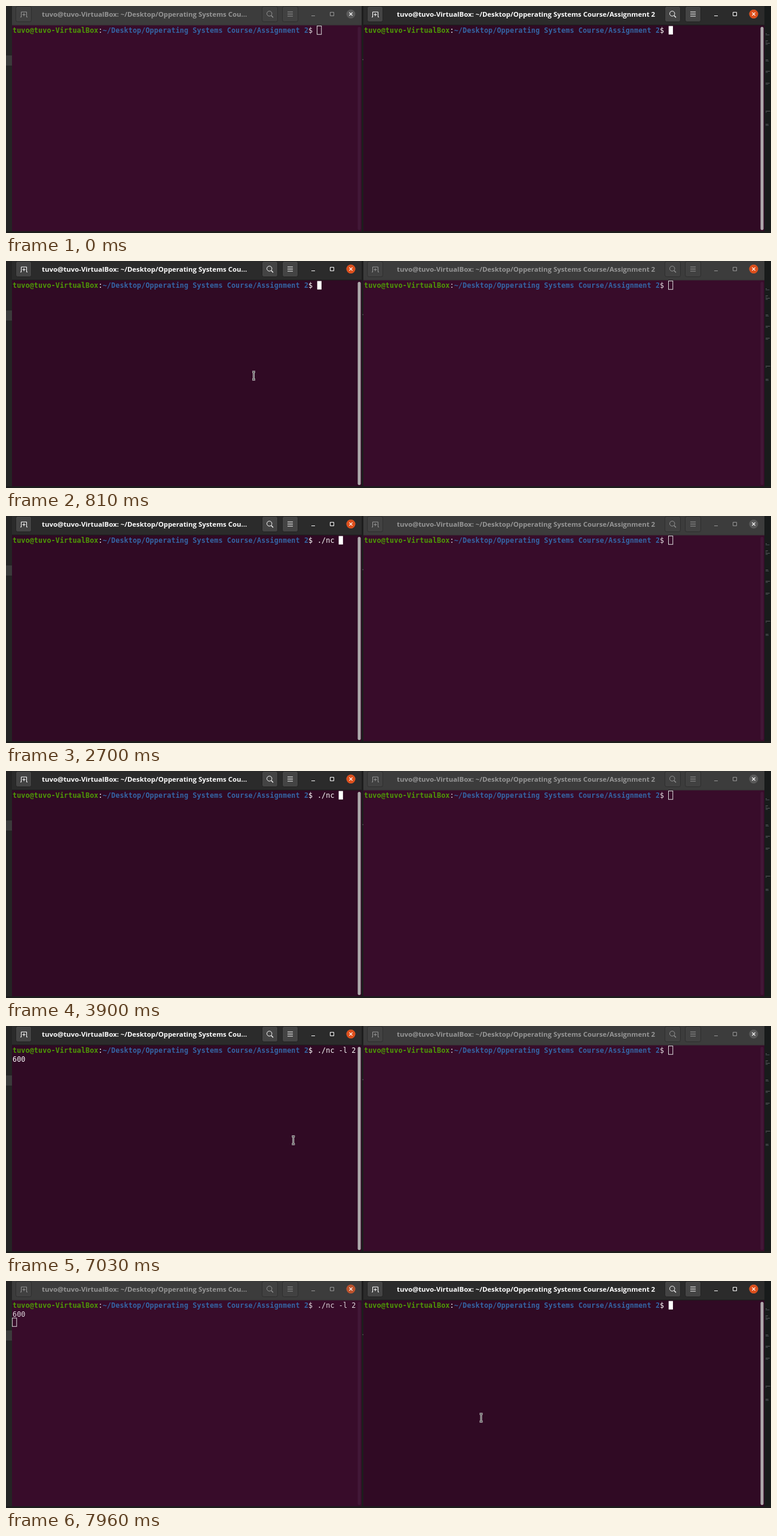
Write an HTML page that moves like this. It is 1280 px wide and 381 px high and loops after 8000 ms.

```html
<!DOCTYPE html>
<html lang="en">
<head>
<meta charset="utf-8">
<title>Two terminals</title>
<style>
html, body { margin: 0; width: 100%; height: 100%; overflow: hidden; background: #1d1d1d; }
svg { display: block; }
text { white-space: pre; }
.title { font: bold 11.39px "Open Sans", "Noto Sans", sans-serif; }
.term { font: 11.7px "DejaVu Sans Mono", monospace; letter-spacing: .138px; fill: #fff; }
.user, .path { font-weight: bold; fill-opacity: 1; }
.user { fill: #4e9a06; }
.path { fill: #3465a4; }
</style>
</head>
<body>
<svg id="stage" width="1280" height="381" viewBox="0 0 1280 381"></svg>
<script>
const LOOP = 8000, CELL = 7.182, LINE = 14.3, TOP = 33.6, PROMPT = 71, COLS = 80;
const HOST = "tuvo@tuvo-VirtualBox";
const DIR = "~/Desktop/Opperating Systems Course/Assignment 2";

const WINDOWS = [
  { x: 10, end: 595, title: 60, label: `${HOST}: ${DIR.slice(0, 32)}...` },
  { x: 598, end: 1269, title: 654, label: `${HOST}: ${DIR}` }
];

// Each click starts a focus change; fades take FADE ms, blinking has a half period of BLINK ms
const CLICKS = [600, 7700], CLICK_SHOWN = 130, FADE = 180, CLOSE_LAG = 190, BLINK = 600;
const [toLeft, toRight] = CLICKS.map(t => t + 25);

const BURSTS = [
  { at: 1220, text: "./", gap: 150 }, { at: 2430, text: "n" }, { at: 2630, text: "c ", gap: 70 },
  { at: 4500, text: "-l", gap: 70 }, { at: 4770, text: " " }, { at: 5430, text: "2" },
  { at: 5840, text: "600", gap: 130 }, { at: 6300, text: "\n" }
];
const KEYS = BURSTS.flatMap(({ at, text, gap = 0 }) => [...text].map((char, i) => ({ char, time: at + i * gap })));

const MOVES = [
  { start: 130, time: 270, from: [560, 328], to: [414.5, 192.5], power: 2 },
  { start: 6830, time: 270, from: [414.5, 192.5], to: [503.5, 191.5], power: 1 },
  { start: 7400, time: 100, from: [503.5, 191.5], to: [795, 229.5], power: 1 }
];

const ramp = (t, start, time) => Math.min(1, Math.max(0, (t - start) / time));

function mouseAt(t) {
  const typing = t >= KEYS[0].time && t < MOVES[1].start;
  const move = MOVES.filter(m => m.start <= t).pop();
  if (!move || typing) return null;
  const p = 1 - (1 - ramp(t, move.start, move.time)) ** move.power;
  return move.from.map((v, i) => v + (move.to[i] - v) * p);
}

const rect = (x, y, w, h, fill, more = "") =>
  `<rect x="${x}" y="${y}" width="${w}" height="${h}" fill="${fill}" ${more}/>`;
const line = (d, stroke, width = 1) =>
  `<path d="${d}" fill="none" stroke="${stroke}" stroke-width="${width}"/>`;

function chrome({ x, end, title, label }, active) {
  const c = active
    ? { head: "#2b2b2b", edge: "#1b1b1b", btn: "#444", rim: "#222", ink: "#fff", body: "#300a24", bar: "#aea9ac" }
    : { head: "#3c3c3c", edge: "#353535", btn: "#414141", rim: "#2e2e2e", ink: "#969696", body: "#380c2a", bar: "#421737" };
  const button = left => rect(left + .5, .5, 26, 26, c.btn, `rx="3" stroke="${c.rim}"`);
  const tab = x + 6, tools = end - 167, w = end - x;
  return rect(x, 0, w, 32, c.head) +
    rect(x, 32, w, 346, c.body) +
    rect(x, 31.5, w, 1, c.edge) +
    button(tab) + button(tools) + button(tools + 34) +
    line(`M${tab + 8} 18.5h1.5v-8.5h9v8.5h1.5M${tab + 11.5} 14.5h5m-2.5-2.5v5`, c.ink) +
    `<circle cx="${tools + 12.7}" cy="12.8" r="4.2" fill="none" stroke="${c.ink}"/>` +
    line(`M${tools + 15.8} 16l3.2 3.2`, c.ink, 1.3) +
    line(`M${tools + 43} 10h9m-9 3.5h9m-9 3.5h9`, c.ink) +
    line(`M${tools + 83} 16.5h6`, c.ink) +
    line(`M${tools + 114.5} 10.5h6v6h-6z`, c.ink) +
    `<text class="title" x="${title}" y="17.6" fill="${c.ink}">${label}</text>` +
    rect(end - 6.5, 35, 5, 341, c.bar, 'rx="2.5"');
}

function buildWindow(win, i) {
  const cx = win.end - 18, left = win.x + 1, baseline = TOP + 11.8;
  const close = (fill, id) => `<circle id="${id}" cx="${cx}" cy="13.5" r="7.5" fill="${fill}"/>`;
  return chrome(win, false) +
    `<g id="active${i}">${chrome(win, true)}</g>` +
    close("#5a5a5a", "idle" + i) + close("#dd4f1c", "close" + i) +
    line(`M${cx - 2.6} 10.9l5.2 5.2m0-5.2l-5.2 5.2`, "#fff", 1.3) +
    `<g class="term" id="term${i}"><text x="${left}" y="${baseline}"><tspan class="user">${HOST}</tspan>:` +
    `<tspan class="path">${DIR}</tspan>$</text>` +
    `<text id="first${i}" x="${left + PROMPT * CELL}" y="${baseline}"></text>` +
    `<text id="second${i}" x="${left}" y="${baseline + LINE}"></text></g>` +
    `<rect id="caret${i}" stroke="#ddd"/>`;
}

// Slivers of the editor showing behind the windows
function backdrop() {
  let seed = 7;
  const random = () => (seed = seed * 16807 % 2147483647) / 2147483647;
  const marks = [46, 58, 62, 90, 109, 129, 176, 198].map(y =>
    rect(1271, y, 2 + 7 * random(), 1, "#5a5a5c") + rect(1271, y + 2, 7 * random(), 1, "#484c54"));
  return rect(0, 0, 1280, 381, "#1d1d1d") + rect(0, 0, 10, 378, "#242424") +
    rect(0, 83, 10, 17, "#3b3b3b") + rect(1269, 0, 11, 378, "#181b1b") + marks.join("");
}

const ibeam = "M-2.5-6.5h5M0-6.5v13M-2.5 6.5h5";
document.getElementById("stage").innerHTML = backdrop() + WINDOWS.map(buildWindow).join("") +
  rect(596.5, 89.5, 1.5, 1, "#777") +
  `<g id="mouse"><circle id="click" r="12" fill="#968212"/>` +
  line(ibeam, "#eee", 2.8) + line(ibeam, "#222", 1) + `</g>`;

const $ = id => document.getElementById(id);
const set = (id, values) => {
  for (const key in values) $(id).setAttribute(key, values[key]);
};

function placeCaret(i, cell, focused, since) {
  const x = WINDOWS[i].x + 1 + cell % COLS * CELL, y = TOP + Math.floor(cell / COLS) * LINE;
  const lit = !focused || Math.floor(since / BLINK) % 2 === 0;
  set("caret" + i, focused
    ? { x: x - .2, y, width: 7.2, height: 14.2, fill: "#fff", "stroke-width": 0, opacity: +lit }
    : { x: x - .4, y: y - .1, width: 7.2, height: 14.2, fill: "none", "stroke-width": 1, opacity: 1 });
}

function draw(t) {
  const focusAt = lag => ramp(t, toLeft + lag, FADE) - ramp(t, toRight + lag, FADE);
  const now = focusAt(0), late = focusAt(CLOSE_LAG);
  [[now, late], [1 - now, 1 - late]].forEach(([level, lagged], i) => {
    set("active" + i, { opacity: level });
    set("term" + i, { "fill-opacity": .85 + .15 * level });
    set("close" + i, { opacity: Math.max(level, lagged) });
  });

  const keys = KEYS.filter(k => k.time <= t);
  const typed = keys.map(k => k.char).join(""), room = COLS - PROMPT;
  $("first0").textContent = typed.slice(0, room);
  $("second0").textContent = typed.slice(room).trim();
  const lastKey = keys.length ? keys[keys.length - 1].time : toLeft;
  const leftFocused = t >= toLeft && t < toRight + 30;
  placeCaret(0, typed.endsWith("\n") ? 2 * COLS : PROMPT + typed.length, leftFocused, t - lastKey);
  placeCaret(1, PROMPT, !leftFocused, t < toLeft ? t + 330 : t - toRight);

  const spot = mouseAt(t);
  set("mouse", { visibility: spot ? "visible" : "hidden", transform: `translate(${spot || "0,0"})` });
  set("click", { opacity: +CLICKS.some(c => t >= c && t < c + CLICK_SHOWN) });
}

const start = performance.now();
function tick() {
  draw((performance.now() - start) % LOOP);
  requestAnimationFrame(tick);
}
tick();
</script>
</body>
</html>
```
